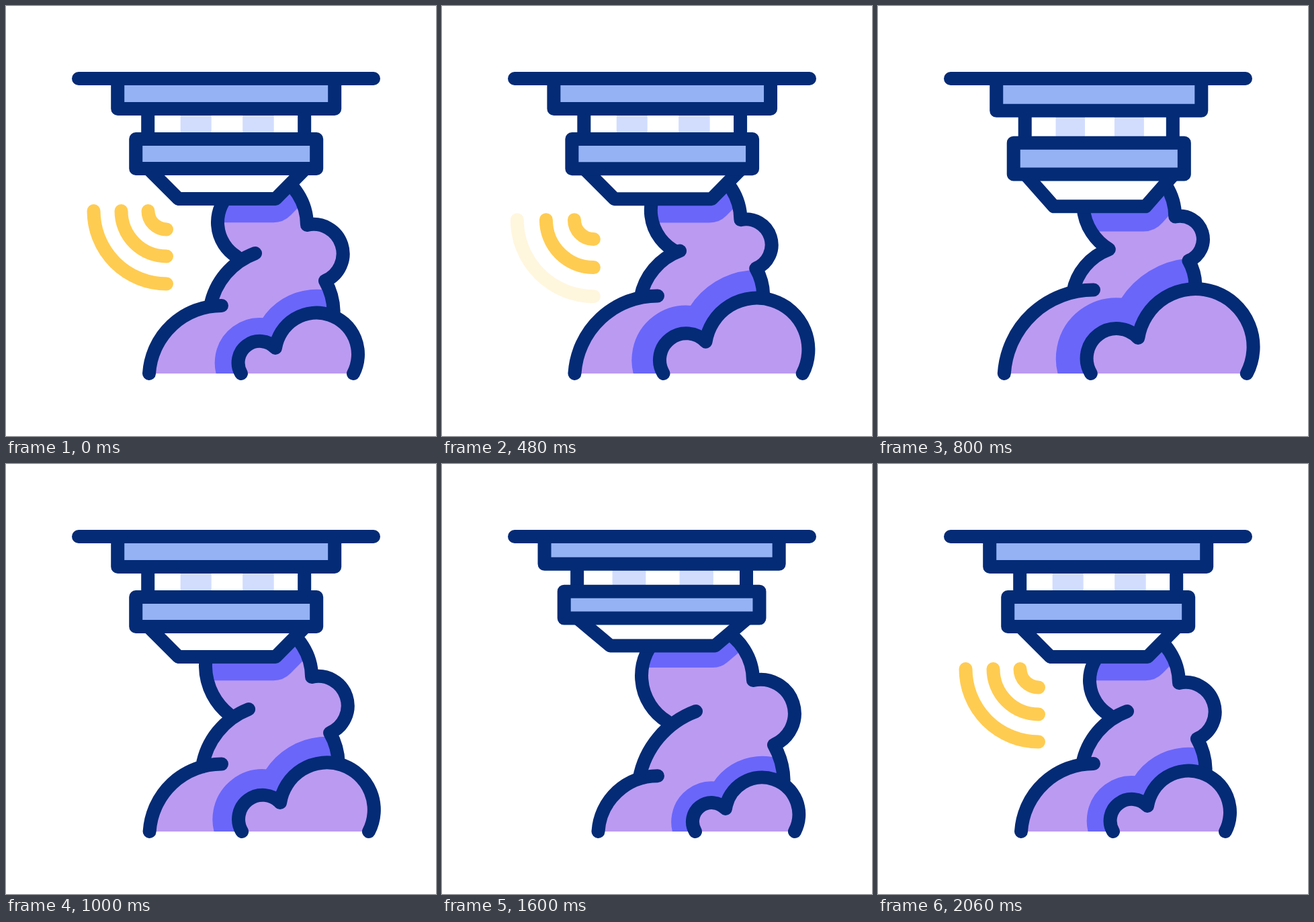
Animation of 640x640 px, one loop 2100 ms. Source, as an HTML page:

```html
<!DOCTYPE html>
<html lang="en">
<head>
<meta charset="utf-8">
<title>Smoke detector</title>
<style>
  html, body { margin: 0; width: 100%; height: 100%; overflow: hidden; background: #fff; }
  svg { display: block; width: 100vw; height: 100vh; }
  .line { fill: none; stroke: #042b76; stroke-width: 20; stroke-linecap: round; stroke-linejoin: round; }
  .panel { fill: #94b2f4; }
  .white { fill: #fff; }
  .smoke { fill: #bb9af2; }
  .shade { fill: none; stroke: #6a66fa; stroke-linejoin: round; }
  .wave { fill: none; stroke: #ffcc52; stroke-width: 20; stroke-linecap: round; }
</style>
</head>
<body>
<svg viewBox="0 0 640 640">
  <clipPath id="bodyClip"><path id="clipShape"/></clipPath>
  <path id="body" class="smoke"/>
  <g clip-path="url(#bodyClip)">
    <path id="topShade" class="shade"/>
    <path id="frontShade" class="shade"/>
  </g>
  <path id="bodyLines" class="line"/>
  <path id="frontFill" class="smoke"/>
  <path id="frontLine" class="line"/>
  <path id="funnel" class="line white"/>
  <path id="slots" fill="#d2ddfe"/>
  <path id="posts" class="line"/>
  <path id="plate" class="line panel"/>
  <path id="box" class="line panel"/>
  <path class="line" d="M108 108H547"/>
  <path class="wave"/>
  <path class="wave"/>
  <path class="wave"/>
</svg>
<script>
const LOOP = 2100, FLOOR = 547;
const el = id => document.getElementById(id);
const draw = (id, d) => el(id).setAttribute('d', d);
const clamp = v => Math.max(0, Math.min(1, v));

// Smooth curve through keys that never overshoots them.
function track(times, values) {
  const n = times.length;
  const slope = i => (values[i + 1] - values[i]) / (times[i + 1] - times[i]);
  const tangents = values.map((_, i) => {
    if (i === 0 || i === n - 1) return 0;
    const a = slope(i - 1), b = slope(i);
    return a * b > 0 ? 2 * a * b / (a + b) : 0;
  });
  return t => {
    let i = 0;
    while (i < n - 2 && t >= times[i + 1]) i++;
    const h = times[i + 1] - times[i], u = (t - times[i]) / h;
    const s = u * u * (3 - 2 * u);
    return values[i] + (values[i + 1] - values[i]) * s
      + h * u * (1 - u) * (tangents[i] * (1 - u) - tangents[i + 1] * u);
  };
}

const smokeTimes = [0, 833, 1000, 1260, 1600, 2060, LOOP];
const smokeKeys = {
  backR: [108, 133.3, 107.5, 86, 88.5],
  startX: [350, 316.7, 351, 380, 377],
  dipX: [401, 387.2, 408, 427, 422],
  dipY: [509, 494, 504, 512, 513],
  endX: [517, 549, 540, 531, 525],
  midX: [371, 343.4, 361, 377, 378],
  midY: [368, 362.3, 365, 367, 368],
  midEndX: [304, 290, 292, 290, 293.5],
  leftX: [315, 304.5, 297, 290.5, 297],
  leftY: [322, 293, 300, 309, 315],
  leftR: [60, 82, 93, 94, 80],
  leftEndY: [373, 362, 373, 384, 383],
  bumpX: [448, 442.2, 455, 467, 463],
  bumpY: [326, 313.4, 317, 319, 322],
  bumpEndX: [475, 462.4, 482, 498, 494],
  bumpEndY: [409, 379, 400, 416, 418]
};
const smokeTracks = Object.entries(smokeKeys).map(([name, v]) =>
  [name, track(smokeTimes, [...v, v[0], v[0]])]);
const squash = track([0, 470, 650, 1000, 1260, 1600, 2060, LOOP], [0, 0, 1, 0, 0, -0.88, 0, 0]);

const pt = p => p[0].toFixed(2) + ' ' + p[1].toFixed(2);
const move = p => 'M' + pt(p);
const line = p => 'L' + pt(p);
const arc = (r, p, large = 0) => `A${r.toFixed(3)} ${r.toFixed(3)} 0 ${large} 1 ${pt(p)}`;
const dist = (a, b) => Math.hypot(a[0] - b[0], a[1] - b[1]);

function drawSmoke(t) {
  const s = Object.fromEntries(smokeTracks.map(([name, f]) => [name, f(t)]));

  const backY = FLOOR - s.backR * 0.935;
  const backStart = [321 - s.backR, FLOOR], backEnd = [321, backY];
  const back = arc(s.backR, backEnd);

  const midStart = [s.midEndX,
    backY + s.backR - Math.sqrt(s.backR ** 2 - (321 - s.midEndX) ** 2)];
  const midEnd = [s.midX, s.midY];
  const mid = arc(dist(midStart, midEnd) * 1.01, midEnd);

  const r = s.leftR;
  const leftStart = [s.leftX + r - Math.sqrt(r * r - (s.leftEndY - s.leftY) ** 2), s.leftEndY];
  const leftEnd = [s.leftX + r * 0.357, s.leftY - r * 0.766];
  const left = arc(r, leftEnd);

  const bump = [s.bumpX, s.bumpY], bumpEnd = [s.bumpEndX, s.bumpEndY];
  const half = dist(bump, bumpEnd) / 2;
  const rightR = 86;
  const rightStart = [s.bumpX - rightR * 0.577, s.bumpY - rightR * 0.906];
  const rightEnd = [s.bumpEndX + half * 0.29, s.bumpEndY + half * 1.04];
  const right = arc(rightR, bump) + arc(half * 1.004, bumpEnd) + arc(half * 2.2, rightEnd);

  const body = move(backStart) + back + line(midStart) + mid + line(leftStart) + left
    + line(rightStart) + right + line([rightEnd[0], FLOOR]) + 'Z';
  draw('body', body);
  draw('clipShape', body);
  draw('bodyLines', move(backStart) + back + move(midStart) + mid
    + move(leftStart) + left + move(rightStart) + right);

  const start = [s.startX, FLOOR], dip = [s.dipX, s.dipY], end = [s.endX, FLOOR];
  const bigR = dist(dip, end) / 2 * 1.0135;
  const front = move(start) + arc(dist(start, dip) / 2 * 1.006, dip) + arc(bigR, end, 1);
  draw('frontFill', front + 'Z');
  draw('frontLine', front);
  draw('frontShade', front);
  el('frontShade').setAttribute('stroke-width', 2 * (0.45 * bigR + 7));
}

function drawDetector(t) {
  const k = squash(t);
  const cx = 327.7 + (k > 0 ? 1.8 : 0.7) * k;
  const x = dx => cx + dx * (1 - 0.092 * k);
  const y = v => 108 + (v - 108) * (1 + 0.105 * k);
  const rect = (x1, y1, x2, y2) => `M${x(x1)} ${y(y1)}H${x(x2)}V${y(y2)}H${x(x1)}Z`;
  const funnel = inset => move([x(-116), y(242)]) + line([x(-71), y(287)])
    + line([x(73.5 - inset), y(287)]) + line([x(118 - inset), y(242)]);

  draw('plate', rect(-161.5, 108, 161.5, 153));
  draw('box', rect(-134.5, 198, 134.5, 242));
  draw('slots', rect(-68, 153, -22, 198) + rect(24.5, 153, 71, 198));
  draw('posts', [-116.5, 116.5].map(p => `M${x(p)} ${y(153)}V${y(198)}`).join(''));
  draw('funnel', funnel(0));
  draw('topShade', funnel(3));
  el('topShade').setAttribute('stroke-width', 2 * (35.3 + 3 * k));
}

const waves = [...document.querySelectorAll('.wave')];
function drawWaves(t) {
  const away = t > 200 && t < 700 ? 13 * ((t - 200) / 280) ** 2.8 : 0;
  waves.forEach((wave, i) => {
    const r = [108.5, 67.5, 27.5][i] * (1 + away * 0.0039);
    const cx = 239 - away, cy = 305 + away;
    wave.setAttribute('d', `M${cx - r} ${cy}A${r} ${r} 0 0 0 ${cx} ${cy + r}`);
    const fadeOut = 1 - (t - 400 - i * 100) / 100;
    const fadeIn = (t - 1900 + i * 100) / 100;
    wave.setAttribute('opacity', clamp(t < 1000 ? fadeOut : fadeIn));
  });
}

function render(t) {
  drawSmoke(t);
  drawDetector(t);
  drawWaves(t);
}

const began = performance.now();
function tick() {
  render((performance.now() - began) % LOOP);
  requestAnimationFrame(tick);
}
tick();
</script>
</body>
</html>
```
